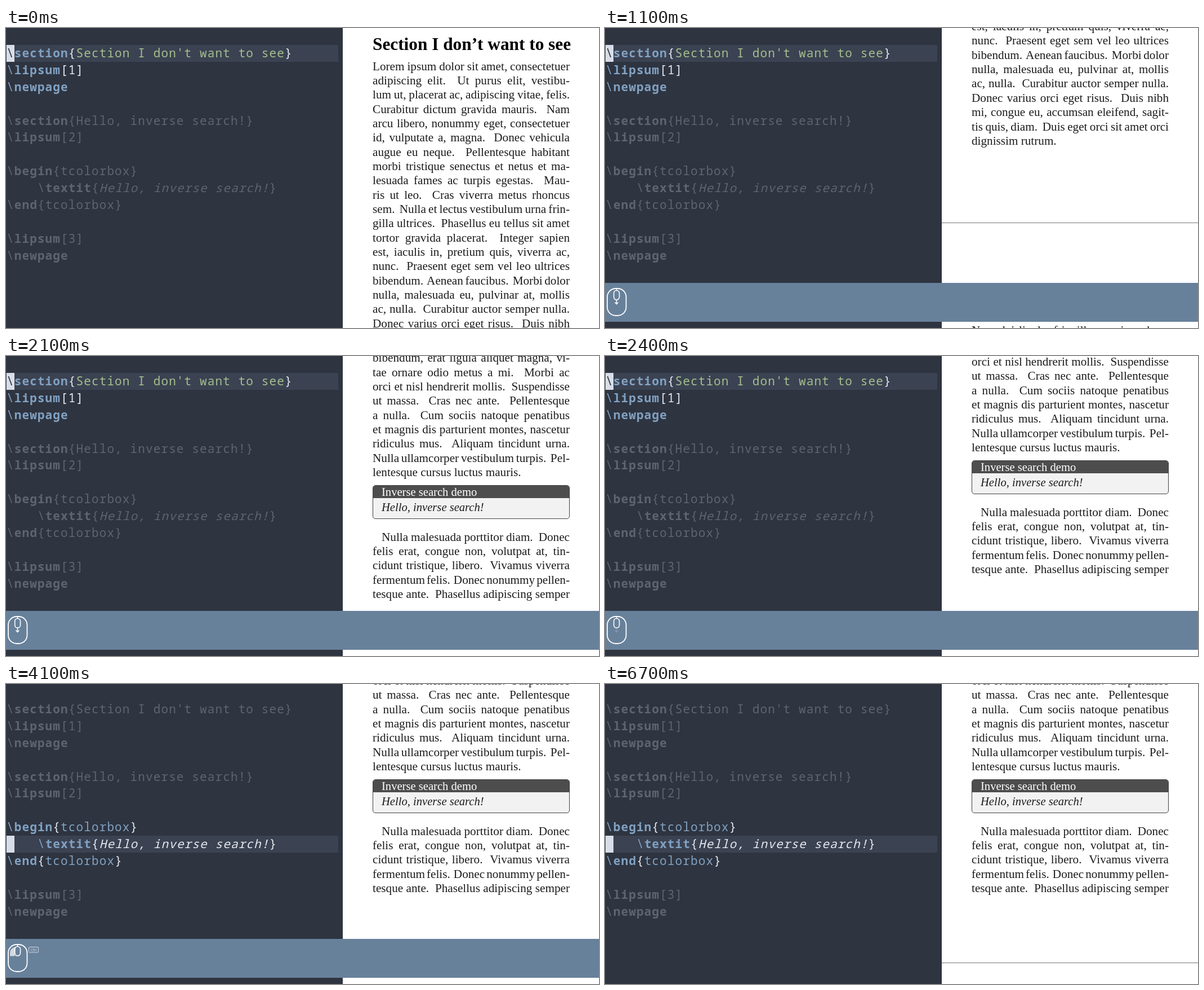
These frames come from a looping animation (1053x532 px, 7700 ms). An HTML page:

```html
<!DOCTYPE html>
<html lang="en">
<head>
<meta charset="utf-8">
<title>Inverse search</title>
<style>
  html, body { margin: 0; width: 100%; height: 100%; overflow: hidden; }
  #stage { position: relative; width: 1053px; height: 532px; overflow: hidden; background: #fff; }

  /* editor */
  #editor {
    position: absolute; left: 0; top: 0; width: 598px; height: 532px;
    background: #2e3440; color: #e5e9f0;
    font: 21px "Noto Sans Mono", "DejaVu Sans Mono", monospace;
    letter-spacing: 1.12px; font-variant-ligatures: none;
  }
  #row { position: absolute; left: 0; width: 590px; height: 29.9px; background: #3b4252; }
  #row::before {
    content: ""; position: absolute; left: 1px; width: 14px; height: 100%; background: #d8dee9;
  }
  #code { position: absolute; left: 1px; top: 30px; white-space: pre; line-height: 29.9px; }
  #code div { height: 29.9px; }
  #code b { font-weight: 600; color: #81a1c1; }
  #code u { text-decoration: none; color: #81a1c1; }
  #code s { text-decoration: none; color: #a3be8c; }
  #code .dim, #code .dim * { color: #5f646f; }
  #code .under { color: #2e3440; }

  /* typeset pages */
  #view {
    position: absolute; left: 598px; top: 0; width: 455px; height: 532px; overflow: hidden;
    color: #1c1c1c; font: 21.2px/25.35px "Liberation Serif", "Times New Roman", serif;
  }
  .page { position: absolute; left: 53px; width: 350px; padding-top: 8.8px; white-space: nowrap; }
  .page::after {
    content: ""; position: absolute; left: -53px; top: 745px;
    width: 455px; height: 1px; background: #777;
  }
  h2 { margin: 0; height: 46.83px; font-size: 31.3px; line-height: 40px; color: #000; }
  .line { height: 25.35px; text-align: justify; text-align-last: justify; word-spacing: -.12em; }
  .line.end { text-align-last: left; word-spacing: 0; }
  .line.indent { padding-left: 16px; }
  .frame {
    box-sizing: border-box; position: relative; height: 60px; margin: 9.7px 0 19.4px;
    border: 1.5px solid #404040; border-radius: 5px; background: #f2f2f2;
    font-size: 20.6px; overflow: hidden;
  }
  .frame span { display: block; height: 21.5px; padding-left: 15px; line-height: 22px; background: #4d4d4d; color: #fff; }
  .frame i { display: block; padding-left: 15px; line-height: 33px; }

  /* input display */
  #bar { position: absolute; left: 0; top: 452px; width: 1053px; height: 69px; background: #68819b; }
  #bar svg { display: block; }
</style>
</head>
<body>
<div id="stage">
  <div id="editor">
    <div id="row"></div>
    <div id="code"></div>
  </div>
  <div id="view"><div id="doc"></div></div>
  <div id="bar">
    <svg width="100" height="69" viewBox="0 452 100 69" fill="none" stroke="#fff" stroke-width="1.8">
      <path id="press" d="M7 482.5V479Q7 467 18 466.5L15.5 471V482.5Z" fill="#fff" stroke="none"/>
      <rect x="4" y="462" width="33.5" height="48" rx="15"/>
      <path d="M20.5 462V466" stroke-width="1.5"/>
      <rect x="15.7" y="465.5" width="9.8" height="16.5" rx="4.9" stroke-width="1.6"/>
      <path id="arrow" d="M20.5 482V489M17.6 486.5L20.5 489.6L23.4 486.5" stroke-width="1.5"/>
      <g id="key">
        <rect x="40.5" y="466.5" width="17" height="9.5" rx="1.5" stroke-width="1"/>
        <text x="49" y="473.6" text-anchor="middle" font-size="6.5" fill="#fff" stroke="none"
              font-family="Roboto, sans-serif">Ctrl</text>
      </g>
    </svg>
  </div>
</div>
<script>
const LOOP = 7700, PAGE = 868, ROW = 29.9;
const $ = id => document.getElementById(id);

// Editor text: b = command, u = environment name, s = title
const cmd = name => `\\<b>${name}</b>`;
const blue = name => `<u>\\</u><b>${name}</b>`;
const source = [
  ['before', `<u id="slash">\\</u><b>section</b>{<s>Section I don't want to see</s>}`],
  ['before', blue('lipsum') + '[1]'],
  ['before', blue('newpage')],
  ['dim', ''],
  ['dim', cmd('section') + '{Hello, inverse search!}'],
  ['dim', cmd('lipsum') + '[2]'],
  ['dim', ''],
  ['after', blue('begin') + '{<u>tcolorbox</u>}'],
  ['after', '    ' + blue('textit') + '{<i>Hello, inverse search!</i>}'],
  ['after', blue('end') + '{<u>tcolorbox</u>}'],
  ['dim', ''],
  ['dim', cmd('lipsum') + '[3]'],
  ['dim', cmd('newpage')]
];
$('code').innerHTML = source.map(([kind, html]) => `<div class="${kind}">${html}</div>`).join('');

// Typeset text: a leading ">" indents, a trailing "|" ends a paragraph
const first = `Lorem ipsum dolor sit amet, consectetuer
adipiscing elit. Ut purus elit, vestibu-
lum ut, placerat ac, adipiscing vitae, felis.
Curabitur dictum gravida mauris. Nam
arcu libero, nonummy eget, consectetuer
id, vulputate a, magna. Donec vehicula
augue eu neque. Pellentesque habitant
morbi tristique senectus et netus et ma-
lesuada fames ac turpis egestas. Mau-
ris ut leo. Cras viverra metus rhoncus
sem. Nulla et lectus vestibulum urna frin-
gilla ultrices. Phasellus eu tellus sit amet
tortor gravida placerat. Integer sapien
est, iaculis in, pretium quis, viverra ac,
nunc. Praesent eget sem vel leo ultrices
bibendum. Aenean faucibus. Morbi dolor
nulla, malesuada eu, pulvinar at, mollis
ac, nulla. Curabitur auctor semper nulla.
Donec varius orci eget risus. Duis nibh
mi, congue eu, accumsan eleifend, sagit-
tis quis, diam. Duis eget orci sit amet orci
dignissim rutrum.|`;
const second = `Nam dui ligula, fringilla a, euismod so-
dales, sollicitudin vel, wisi. Morbi auctor
lorem non justo. Nam lacus libero, pre-
tium at, lobortis vitae, ultricies et, tel-
lus. Donec aliquet, tortor sed accumsan
bibendum, erat ligula aliquet magna, vi-
tae ornare odio metus a mi. Morbi ac
orci et nisl hendrerit mollis. Suspendisse
ut massa. Cras nec ante. Pellentesque
a nulla. Cum sociis natoque penatibus
et magnis dis parturient montes, nascetur
ridiculus mus. Aliquam tincidunt urna.
Nulla ullamcorper vestibulum turpis. Pel-
lentesque cursus luctus mauris.|`;
const third = `>Nulla malesuada porttitor diam. Donec
felis erat, congue non, volutpat at, tin-
cidunt tristique, libero. Vivamus viverra
fermentum felis. Donec nonummy pellen-
tesque ante. Phasellus adipiscing semper`;
const demo = '<div class="frame"><span>Inverse search demo</span><i>Hello, inverse search!</i></div>';

const typeset = text => text.split('\n').map(line => {
  const kind = (line.endsWith('|') ? ' end' : '') + (line.startsWith('>') ? ' indent' : '');
  // wider gap after a full stop
  const words = line.replace(/[>|]/g, '').replace(/\. /g, '.\u00a0 ');
  return `<div class="line${kind}">${words}</div>`;
}).join('');
const page = (n, title, body) =>
  `<div class="page" style="top:${n * PAGE}px"><h2>${title}</h2>${body}</div>`;
$('doc').innerHTML =
  page(0, 'Section I don’t want to see', typeset(first)) +
  page(1, 'Hello, inverse search!', typeset(second) + demo + typeset(third));

// Held values as [time, value]
const scroll = [
  [0, 0], [800, 78], [900, 200], [1000, 320], [1100, 400],
  [1300, 520], [1400, 690], [1500, 840],
  [1700, 900], [1800, 955], [1900, 1000], [2000, 1035], [2100, 1059],
  [2200, 1081], [2300, 1095], [2400, 1103], [2500, 1119]
];
const arrow = [
  [0, 1], [1300, .8], [1400, .65], [1500, .5], [1700, 1], [2200, .75],
  [2300, .45], [2400, .18], [2700, .15], [3000, .12], [3200, .1], [3400, 0]
];
const press = [[0, 0], [3900, .6], [4000, 1], [4100, .7], [4200, .4], [4300, .08], [4600, 0]];
const key = [[0, 0], [3400, .5], [3500, 1], [4100, .7], [4200, .4], [4300, .12]];
const held = (steps, t) => steps.findLast(step => step[0] <= t)[1];

const before = document.querySelectorAll('.before');
const after = document.querySelectorAll('.after');

function draw(t) {
  const jumped = t >= 4000;
  $('row').style.top = 30 + (jumped ? 8 : 0) * ROW + 'px';
  before.forEach(line => line.classList.toggle('dim', jumped));
  after.forEach(line => line.classList.toggle('dim', !jumped));
  $('slash').classList.toggle('under', !jumped);

  $('doc').style.transform = `translateY(${-held(scroll, t)}px)`;
  $('bar').style.visibility = t >= 800 && t < 6700 ? 'visible' : 'hidden';
  $('arrow').style.opacity = held(arrow, t);
  $('press').style.opacity = held(press, t);
  $('key').style.opacity = held(key, t);
}

const start = performance.now();
function tick() {
  draw((performance.now() - start) % LOOP);
  requestAnimationFrame(tick);
}
tick();
</script>
</body>
</html>
```
